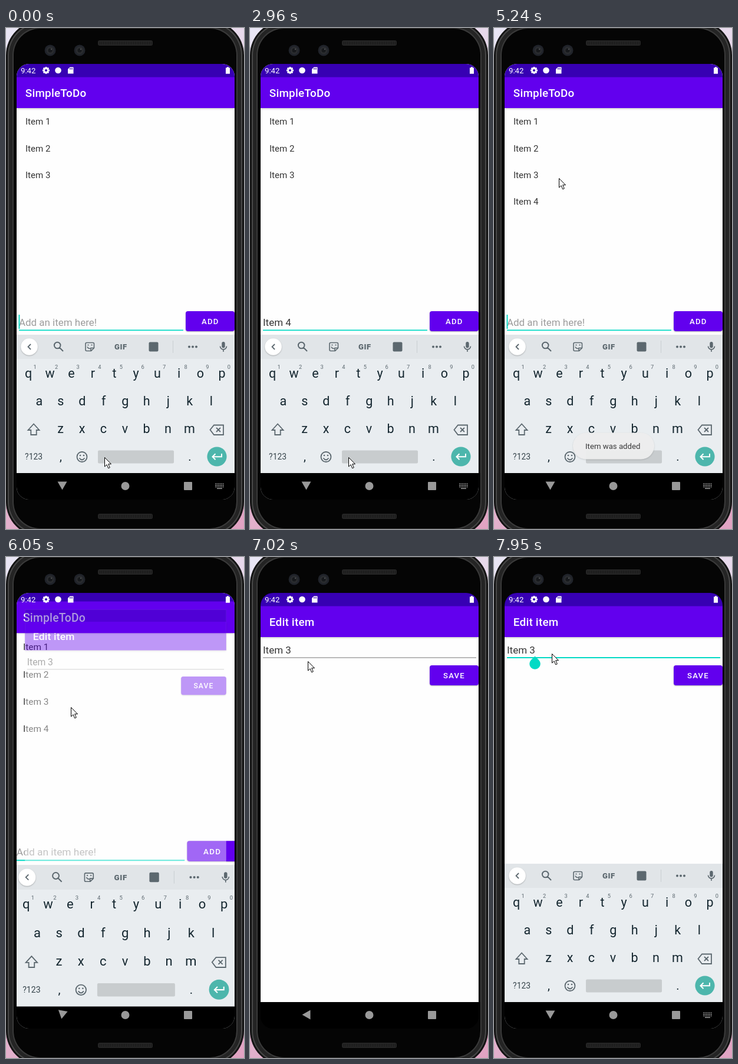
Animation, 404 px wide and 851 px high, one loop 8 s. Source, as an HTML page with a canvas:

```html
<!DOCTYPE html>
<html lang="en">
<head>
<meta charset="utf-8">
<title>To-do app demo</title>
<style>
html, body { margin: 0; width: 100%; height: 100%; overflow: hidden; background: #000; }
canvas { display: block; width: 404px; height: 851px; }
</style>
</head>
<body>
<canvas id="stage" width="404" height="851"></canvas>
<script>
const stage = document.getElementById('stage');
const screenCtx = stage.getContext('2d');
const layer = stage.cloneNode();
const layerCtx = layer.getContext('2d');
let g = screenCtx;

const LOOP = 8000, CX = 203, CY = 431, NAV_TOP = 756;
const PURPLE = '#6200ee', DARK_PURPLE = '#3700b3', TEAL = '#03dac5';
const KEY = '#14262f', ICON = '#5c686f', INK = '#353535', HINT = '#9c9c9c';

// Moments of the story, in ms.
const TYPE = 1150, TYPE_STEP = 282, PRESS = 3720, ADDED = 3850, TOAST_END = 5770;
const FOCUS = 7170, EDIT_CARET = 7420, KEYBOARD = 7391, STRIP_READY = 7830;

// Motion is held in steps, like a screen recording.
const held = t => Math.floor((t + 180) / 135.2) * 135.2 - 180;
const ramp = (t, from, to) => Math.min(1, Math.max(0, (t - from) / (to - from)));
const smooth = p => p * p * (3 - 2 * p);
const easeOut = p => 1 - (1 - p) ** 3;

// Pointer legs: start, end, x, y.
const legs = [[2960, 3470, 341, 495], [4020, 4281, 264, 553], [4281, 4470, 165, 325],
  [4600, 5200, 110, 255], [6050, 6170, 100, 252], [6480, 7150, 98, 164]];
function pointer(t) {
  let x = 167, y = 729;
  for (const [from, to, nx, ny] of legs) {
    const p = smooth(ramp(t, from, to));
    x += (nx - x) * p;
    y += (ny - y) * p;
  }
  return [Math.round(x), Math.round(y)];
}

function typedText(t) {
  return t < TYPE || t >= ADDED ? '' : 'Item 4'.slice(0, 1 + Math.floor((t - TYPE) / TYPE_STEP));
}
// Words in the strip, or null while it shows its icons.
function suggestions(t) {
  const word = typedText(t).trim();
  if (word && word.length < 6) return [word + 's', word, word + "'s"];
  return t >= KEYBOARD && t < STRIP_READY ? [] : null;
}
// The caret stays on while typing, then blinks from the last input.
function caretOn(t) {
  const last = t < TYPE ? -270 : t < ADDED ? Math.min(t, 2440) : t < EDIT_CARET ? 3780 : EDIT_CARET;
  return Math.floor((t - last) / 520) % 2 === 0;
}
const openness = t => ramp(held(t), 5948, 6174);
const keyboardRise = t => ramp(held(t), KEYBOARD, 7661);

function text(str, x, y, size, color, { weight = 400, align = 'left', spacing = 0 } = {}) {
  g.font = `${weight} ${size}px Roboto, sans-serif`;
  g.letterSpacing = spacing + 'px';
  g.textAlign = align;
  g.fillStyle = color;
  g.fillText(str, x, y);
}
function rect(x, y, w, h, color, radius = 0) {
  g.fillStyle = color;
  g.beginPath();
  g.roundRect(x, y, w, h, radius);
  g.fill();
}
function disc(x, y, r, color) {
  g.fillStyle = color;
  g.beginPath();
  g.arc(x, y, r, 0, 7);
  g.fill();
}
function line(d, color = ICON, width = 1.8) {
  g.strokeStyle = color;
  g.lineWidth = width;
  g.stroke(new Path2D(d));
}
function shape(d, color) {
  g.fillStyle = color;
  g.fill(new Path2D(d));
}
function shadowed(blur, dy, alpha, draw) {
  g.save();
  g.shadowColor = `rgba(0,0,0,${alpha})`;
  g.shadowBlur = blur;
  g.shadowOffsetY = dy;
  draw();
  g.restore();
}
function zoomed(scale, draw) {
  g.save();
  g.translate(CX, CY);
  g.scale(scale, scale);
  g.translate(-CX, -CY);
  draw();
  g.restore();
}
// Draws a group on its own layer so that it fades as a whole.
function faded(alpha, draw) {
  if (!alpha) return;
  layerCtx.clearRect(0, 0, 404, 851);
  g = layerCtx;
  draw();
  g = screenCtx;
  g.globalAlpha = alpha;
  g.drawImage(layer, 0, 0);
  g.globalAlpha = 1;
}

function body() {
  const sky = g.createLinearGradient(0, 0, 404, 851);
  sky.addColorStop(0, '#e9e6f5');
  sky.addColorStop(1, '#e0a3c2');
  g.fillStyle = sky;
  g.fillRect(0, 0, 404, 851);
  const rings = [[0, '#141414'], [3, '#484848'], [5, '#242424'], [11, '#3a3a3a'], [13, '#050505']];
  for (const [inset, color] of rings)
    rect(inset, inset - 12, 404 - 2 * inset, 875 - 2 * inset, color, 58 - inset);
  for (const y of [21, 825]) {
    rect(156, y, 93, 9, '#252525', 3);
    for (let x = 159; x < 247; x += 3) rect(x, y + 2, 1, 5, '#171717');
  }
  for (const x of [75, 125]) {
    disc(x, 38, 9.5, '#20232a');
    disc(x, 38, 6.5, '#2a2c2f');
    disc(x, 38, 3.5, '#17191c');
    disc(x + 2, 36, 1.2, '#4b4d50');
  }
}

function windowFrame(title) {
  rect(18, 61, 370, NAV_TOP - 61, '#fefefe');
  shadowed(3, 1, .25, () => rect(18, 83, 370, 53, PURPLE));
  rect(18, 61, 370, 22.4, DARK_PURPLE);
  text(title, 32.8, 117, 18.84, '#fff', { weight: 500, spacing: .236 });
  rect(18, NAV_TOP, 370, 45, '#000');
}
function button(label, y, textX, glow = 0) {
  shadowed(glow ? 5 : 2, glow ? 2 : 1, .3, () => rect(305, y, 83, 34, PURPLE, 4));
  if (glow) rect(305, y, 83, 34, `rgba(255,255,255,${glow})`, 4);
  text(label, textX, y + 22, 13.2, '#fff', { weight: 500, spacing: 1.18 });
}

function listWindow(t) {
  windowFrame('SimpleToDo');
  for (let i = 1; i < 5; i++) {
    g.globalAlpha = i < 4 ? 1 : ramp(t, ADDED, 4120);
    text('Item ' + i, 33, 119.2 + 45.2 * i, 15.07, INK);
  }
  g.globalAlpha = 1;
  const value = typedText(t);
  text(value || 'Add an item here!', 22, 505.5, 16.95, value ? INK : HINT);
  rect(22, 512.5, 279, 1.8, TEAL);
  if (caretOn(t) && !openness(t)) rect(21.5 + (value && g.measureText(value).width), 487, 1.9, 24, TEAL);
  button('ADD', 481, 332, t < PRESS ? 0 : .2 * (1 - ramp(t, PRESS, 4150)));
}

function editWindow(t) {
  const focused = t >= FOCUS;
  windowFrame('Edit item');
  text('Item 3', 22, 163.5, 16.95, INK);
  rect(22, focused ? 170 : 170.5, 362, focused ? 1.9 : 1, focused ? TEAL : '#777');
  button('SAVE', 184, 328);
  if (t >= EDIT_CARET && caretOn(t)) rect(69.3, 145, 1.8, 24, TEAL);
  if (keyboardRise(t)) {
    disc(69.5, 181.5, 9.3, TEAL);
    shape('M69.5 168.5L76.1 175L69.5 182L62.9 175Z', TEAL);
  }
}

function toolStrip(words) {
  rect(18, 521, 370, 41, '#e1e5e8');
  shadowed(2, 1, .25, () => disc(39.5, 541.5, 14.3, '#fff'));
  line(words ? 'M37.5 537l4.5 4.5l-4.5 4.5' : 'M42 537l-4.5 4.5l4.5 4.5');
  rect(366.3, 533, 5.4, 10.5, ICON, 2.7);
  line('M363.5 540.5a5.5 5.5 0 0 0 11 0M369 546v4', ICON, 1.6);
  if (words) {
    words.forEach((word, i) => {
      text(word, 108 + 95 * i, 546, 15, KEY, { align: 'center' });
      if (i) rect(60 + 95 * i, 533, 1, 16, '#c5cacd');
    });
    return;
  }
  line('M92.5 539a5.3 5.3 0 1 0 -10.6 0a5.3 5.3 0 1 0 10.6 0M91 543l6 6', ICON, 2);
  line('M137 534.5h10.5a2 2 0 0 1 2 2v7l-5 5h-7.5a2 2 0 0 1 -2 -2v-10a2 2 0 0 1 2 -2zM149 543.5h-5v5M138 541.5q1.5 3.5 5 3', ICON, 1.6);
  disc(139.5, 538.5, 1.1, ICON);
  disc(145.5, 538.5, 1.1, ICON);
  text('GIF', 184, 546, 13, ICON, { weight: 900, spacing: .6 });
  rect(242.5, 533.5, 16, 16, ICON, 2);
  rect(283, 531, 1, 21, '#c9ced1');
  for (const x of [311, 317, 323]) disc(x, 541.5, 2, ICON);
}

function keyboard(t) {
  rect(18, 521, 370, 290, '#e9edf0');
  toolStrip(suggestions(t));
  const center = { align: 'center' };
  ['qwertyuiop', 'asdfghjkl', 'zxcvbnm'].forEach((letters, row) =>
    [...letters].forEach((letter, i) =>
      text(letter, 38 + 18.25 * row + 18 * (row > 1) + 36.5 * i, 593.5 + 47.4 * row, 21.5, KEY, center)));
  for (let i = 0; i < 10; i++)
    text((i + 1) % 10, 49 + 36.6 * i, 578.5, 9.3, ICON, center);
  line('M47 672.5L56.5 683h-4.8v8h-9.4v-8h-4.8z');
  line('M346.5 682.5l6.5-8h16v16.5h-16zM357 679l7 7m0-7l-7 7');
  text('?123', 47, 733, 13.8, '#35434a', center);
  text(',', 93, 735, 20, KEY, center);
  text('.', 312, 735, 20, KEY, center);
  line('M137.5 728.5a8.5 8.5 0 1 0 -17 0a8.5 8.5 0 1 0 17 0M124.5 730.5q4.5 6 9 0');
  disc(126, 726, 1.3, ICON);
  disc(132, 726, 1.3, ICON);
  rect(156, 717.5, 129, 22, '#c8ccce', 2);
  disc(358, 728, 16.6, '#4db6ac');
  line('M366 723v5.3h-15.5m5-5l-5 5l5 5', '#fff', 2);
}

function statusBar() {
  text('9:42', 25, 77, 13.2, '#fff');
  g.save();
  g.translate(68, 72);
  for (let i = 0; i < 4; i++, g.rotate(Math.PI / 4)) rect(-1.5, -6, 3, 12, '#fff', .5);
  disc(0, 0, 4.4, '#fff');
  disc(0, 0, 2, DARK_PURPLE);
  g.restore();
  disc(88.5, 72, 5.3, '#fff');
  shape('M108.5 66.5h6v11h-9.5v-7.5z', '#fff');
  for (let x = 108; x < 114; x += 2) rect(x, 68, 1, 2.5, DARK_PURPLE);
  shape('M373 67.5h2v-1.2h3v1.2h2v10.3h-7z', '#fff');
}

function navBar(t) {
  const color = 'rgba(255,255,255,.6)';
  const opened = openness(t), rise = keyboardRise(t);
  g.save();
  g.translate(95.5, 777.5);
  g.rotate(Math.PI / 2 * opened ** 2.4 * (1 - rise));
  shape('M-8 -7H8L0 7Z', color);
  g.restore();
  disc(202.5, 778, 7, color);
  rect(302, 771, 14, 14, color, 1);
  if (opened && !rise) return;
  for (let i = 0; i < 18; i++)
    rect(355 + i % 6 * 2.6, 773.5 + Math.floor(i / 6) * 2.6, 1.6, 1.6, color);
  rect(358, 781.5, 9, 1.6, color);
}

function draw(t) {
  body();
  g.save();
  g.beginPath();
  g.roundRect(18, 61, 370, 740, 21);
  g.clip();
  rect(18, 61, 370, 740, '#000');

  const opened = openness(t), oldZoom = 1 + .057 * opened;
  const newZoom = .85 + .15 * easeOut(ramp(held(t), 5988, 6243));
  if (opened < 1) zoomed(oldZoom, () => listWindow(t));
  faded(opened, () => zoomed(newZoom, () => editWindow(t)));
  if (opened < 1) {
    zoomed(oldZoom, () => {
      keyboard(t);
      rect(18, NAV_TOP, 370, 60, '#000');
    });
  } else {
    const rise = keyboardRise(t);
    faded(rise, () => {
      g.save();
      g.translate(0, 234 * (1 - rise) ** 1.72);
      keyboard(t);
      g.restore();
    });
    if (rise === 1) rect(18, NAV_TOP, 370, 45, '#000');
  }
  faded(t < TOAST_END ? .95 * ramp(t, 3800, 4250) : 0, () => {
    shadowed(3, 1, .15, () => rect(134, 687.5, 138, 45, '#eee', 22.5));
    text('Item was added', 155, 715, 13.2, '#303030');
  });
  statusBar();
  navBar(t);
  g.restore();

  const [x, y] = pointer(held(t));
  g.save();
  g.translate(x + .5, y + .5);
  const arrow = 'M0 0V15.5L3.6 12.2L6.2 18.3L8.8 17.2L6.2 11.2H11Z';
  shape(arrow, '#fff');
  line(arrow, '#000', 1);
  g.restore();
}

function tick() {
  draw(performance.now() % LOOP);
  requestAnimationFrame(tick);
}
tick();
</script>
</body>
</html>
```
